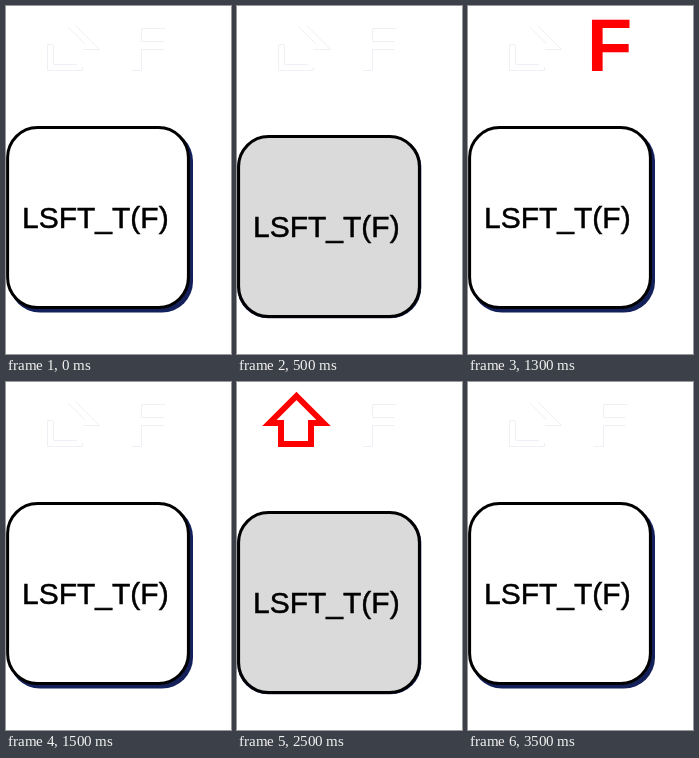
Animation of 225x348 px, one loop 4000 ms. Source, as an HTML page:

```html
<!DOCTYPE html>
<html lang="en">
<head>
<meta charset="utf-8">
<title>Tap and hold key</title>
<style>
  html, body { margin: 0; width: 100%; height: 100%; overflow: hidden; background: #fff; }
  svg { display: block; width: 100vw; height: 100vh; }
  text { font-family: "Liberation Sans", Arial, sans-serif; }
  .ghost { fill: none; stroke: #efeff6; stroke-width: 1; }
</style>
</head>
<body>
<svg viewBox="0 0 225 348">
  <path id="arrowGhost" class="ghost"
    d="M69 19L93.5 43.5H77M62 21L79 38M47 38.5H41.5V64.5H76.5V61M47.5 39V58.5H71"/>
  <path id="letterGhost" class="ghost" d="M159.5 22.5H135.5V35.5H157.5M157.5 43.5H135.5V64.5H126"/>
  <path id="arrow" fill="none" stroke="#f00" stroke-width="6" stroke-miterlimit="10"
    d="M59.5 14L86.5 41H74V62H44V41H32.5Z"/>
  <text id="letter" x="119" y="65" font-size="74" font-weight="700" fill="#f00">F</text>
  <rect id="shadow" y="120" width="184" height="182.5" rx="31" fill="#14205a"/>
  <g id="key">
    <rect id="cap" x="1.6" y="121.6" width="180.8" height="180" rx="30" stroke="#000" stroke-width="3"/>
    <text x="16" y="222" font-size="30" stroke="#000" stroke-width=".5">LSFT_T(F)</text>
  </g>
</svg>
<script>
  const el = id => document.getElementById(id);
  const show = (id, on) => el(id).setAttribute("visibility", on ? "visible" : "hidden");
  const move = (id, x, y) => el(id).setAttribute("transform", `translate(${x} ${y})`);

  function draw(now) {
    const t = now % 4000;
    const within = (from, to) => t >= from && t < to;
    const pressed = within(500, 1000) || within(2000, 3500);
    const tapped = within(1000, 1500);
    const held = within(2500, 3500);

    show("letter", tapped);
    show("letterGhost", !tapped);
    show("arrow", held);
    show("arrowGhost", !held);
    move("key", 0, pressed ? 9 : 0);
    move("shadow", pressed ? 0.3 : 3, pressed ? 9.8 : 4);
    el("cap").setAttribute("fill", pressed ? "#dadada" : "#fff");
  }

  let start;
  function tick(now) {
    start ??= now;
    draw(now - start);
    requestAnimationFrame(tick);
  }
  draw(0);
  requestAnimationFrame(tick);
</script>
</body>
</html>
```
